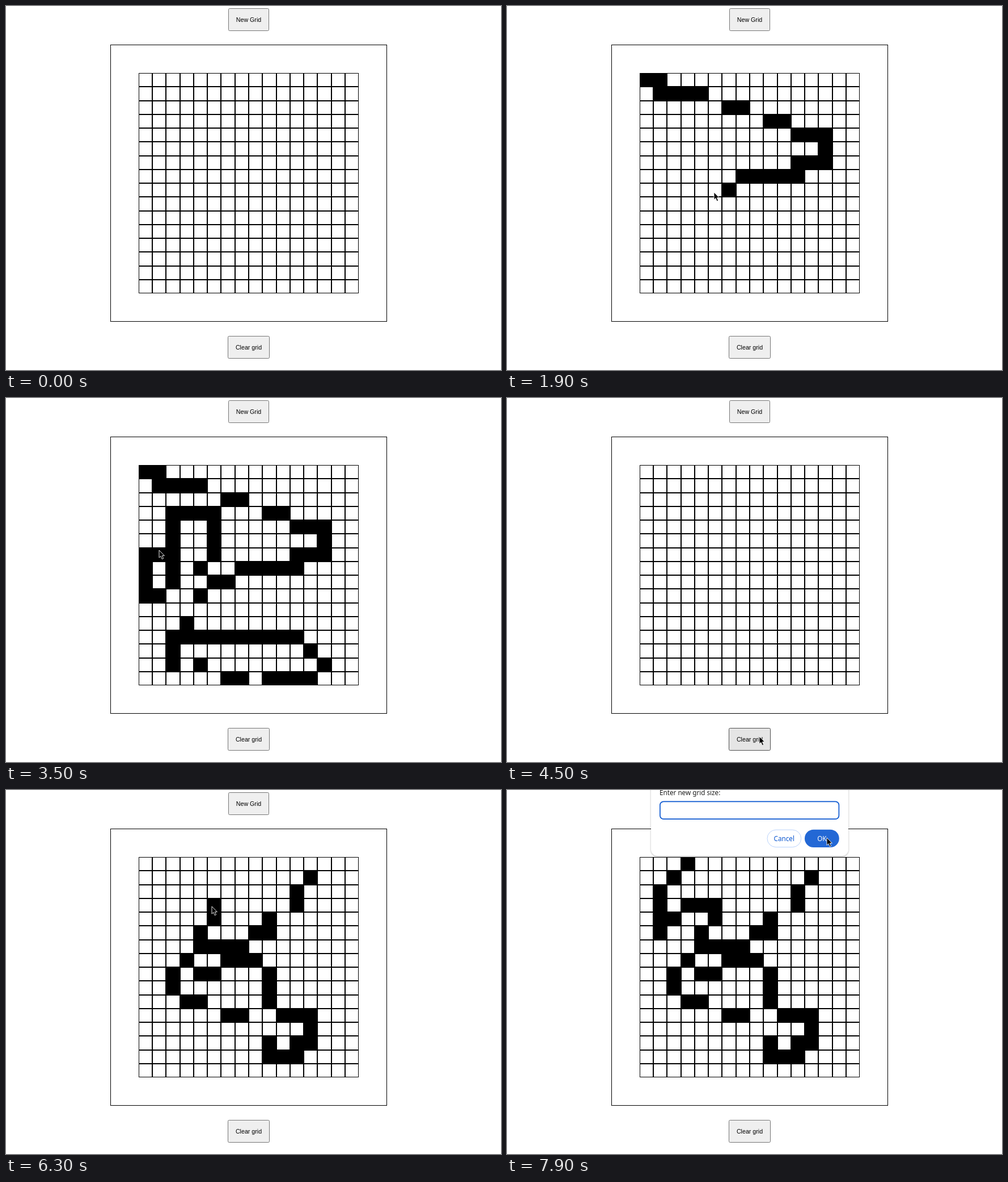
An HTML page for the animation above (8000 ms loop, 873 by 641 pixels).

```html
<!DOCTYPE html>
<html lang="en">
<head>
<meta charset="utf-8">
<title>Grid sketch</title>
<style>
  html, body { margin: 0; width: 100%; height: 100%; overflow: hidden; background: #fff; }
  svg { display: block; width: 100vw; height: 100vh; }
  .line { fill: none; stroke: #000; shape-rendering: crispEdges; }
  .btn rect { fill: #efefef; stroke: #767676; }
  .btn.hover rect { fill: #e5e5e5; stroke: #4f4f4f; }
  .btn text { font: 10.667px "Liberation Sans", Arial, sans-serif; text-anchor: middle; }
  #dialog text { font: 11.7px "Noto Sans", sans-serif; fill: #1f1f1f; }
  #dialog .mid { text-anchor: middle; }
  #panel { filter: drop-shadow(0 1px 1.5px rgba(0, 0, 0, .3)); }
  #ok rect { fill: #0b57d0; }
  #ok.hover rect { fill: #2368d5; }
</style>
</head>
<body>
<svg viewBox="0 0 873 641">
  <rect width="873" height="641" fill="#fff"/>
  <g id="new" class="btn">
    <rect x="392.5" y="4.5" width="71" height="39" rx="2"/>
    <text x="428" y="28">New Grid</text>
  </g>
  <rect class="line" x="184.5" y="68.5" width="487" height="487"/>
  <path id="fill"/>
  <path id="lines" class="line"/>
  <g id="clear" class="btn">
    <rect x="391.5" y="581.5" width="73" height="39" rx="2"/>
    <text x="428" y="605">Clear grid</text>
  </g>
  <g id="dialog">
    <rect id="panel" x="254" y="-46" width="348" height="162" rx="11" fill="#fff"/>
    <text x="269" y="9.4">Enter new grid size:</text>
    <rect x="269.9" y="20.3" width="315.5" height="30.8" rx="6.2" fill="#fff" stroke="#0b57d0" stroke-width="1.7"/>
    <rect id="caret" x="277" y="28" width="1" height="16" fill="#1f1f1f"/>
    <rect x="459" y="70.2" width="59.7" height="30.4" rx="15.2" fill="#fff" stroke="#a8c7fa" stroke-width=".8"/>
    <text class="mid" x="488.8" y="89.7" style="fill:#0b57d0">Cancel</text>
    <g id="ok">
      <rect x="525" y="69.8" width="60.8" height="31.2" rx="15.6"/>
      <text class="mid" x="555.4" y="89.7" style="fill:#fff">OK</text>
    </g>
  </g>
  <path id="cursor" d="M0 0V13.2L3 10.5L5.2 15.7L7.6 14.6L5.4 9.7H9.4Z" stroke="#fff" stroke-width=".9"/>
</svg>
<script>
const $ = id => document.getElementById(id);
const LEFT = 233.97, TOP = 118, CELL = 24.254, COUNT = 16;
const LOOP = 8000, TICK = 100;
const START = 5, CLEAR = 44, DIALOG = 72, CARET_OFF = 77;

// Pointer gestures in cell units, each with the tick at which it ends.
// H and V drag through every cell; L is a quick leap that marks only its end.
const gestures = [
  [13, 'L0,0 H1 V1 H2'],
  [19, 'H4 L6,2 H7 L9,3 H10 L11,4 H13 V6 H11 V7 H7 L6,8 L4.9,8.15'],
  [22, 'L4,9 L3,11 L2,12 V13'],
  [31, 'V14 L4,14.1 L6,15 H7 L9,15.2 H12 L13,14 L12,13 L11,12 H2 L4,7 L5,6 V3 H2 V4.6'],
  [35, 'V8 L1,9 H0 V6 H1 V5.7'],
  [40, 'L8.9,15.6'],
  [45, 'L8.2,19.2'],
  [49, 'L9.2,19.7 L20.9,12.5'],
  [54, 'L19.5,0 L16.2,-3.7 L12,1 L11,2 V3 L9,4 V5 H8 L7.3,5.5'],
  [58, 'L6,7 L5,8 H4 L3,7 L2,8 V9 L3,10 H4 L6,11 H7 L9,12.5'],
  [63, 'V14 H11 V13 H12 V11 H10 L9,10 V8 L8,7 H6 V6 H4 V5 L5,4 V3 L4.8,3.1'],
  [67, 'H3 L2,4 H1 V5 V2 L2,1 L3,0 L3.4,-1.7'],
  [70, 'L7.3,-4.3'],
  [72, 'L7.3,-4.3'],
  [75, 'L12.3,.2'],
  [76, 'L13.1,-1.9']
];

const moves = [], marks = [];

function addGesture(start, end, from, path) {
  let p = from, total = 0;
  const steps = path.split(' ').map(cmd => {
    const [a, b] = cmd.slice(1).split(',').map(Number);
    const q = { H: [a, p[1]], V: [p[0], a], L: [a, b] }[cmd[0]];
    const step = { p, q, drag: cmd[0] !== 'L', len: Math.hypot(q[0] - p[0], q[1] - p[1]) };
    total += step.len;
    p = q;
    return step;
  });
  let t = start;
  for (const { p, q, drag, len } of steps) {
    const span = total ? (end - start) * len / total : end - start;
    const move = { p, q, t, span };
    moves.push(move);
    const n = drag ? Math.ceil(len) : 1;
    for (let k = 1; k <= n; k++) addMark(move, k / n);
    t += span;
  }
  return p;
}

const along = ({ p, q }, k) => p.map((v, i) => v + (q[i] - v) * k);

function addMark(move, k) {
  const [c, r] = along(move, k).map(Math.round);
  const t = move.t + move.span * k;
  if (t < DIALOG && Math.min(c, r) >= 0 && Math.max(c, r) < COUNT) marks.push({ c, r, t });
}

let pos = [-3.6, -4.1], time = START;
for (const [end, path] of gestures) {
  pos = addGesture(time, end, pos, path);
  time = end;
}

const edge = (origin, i) => Math.round(origin + i * CELL);

function cellPath(c, r, inset) {
  const x = edge(LEFT, c) + inset, y = edge(TOP, r) + inset;
  const right = edge(LEFT, c + 1) - inset, bottom = edge(TOP, r + 1) - inset;
  return `M${x} ${y}H${right}V${bottom}H${x}z`;
}

let grid = '';
for (let r = 0; r < COUNT; r++)
  for (let c = 0; c < COUNT; c++) grid += cellPath(c, r, .5);
$('lines').setAttribute('d', grid);

function pointerAt(tick) {
  const move = moves.filter(m => m.t <= tick).pop();
  const [c, r] = along(move, Math.min(1, (tick - move.t) / move.span));
  return [Math.round(LEFT + (c + .5) * CELL), Math.round(TOP + (r + .5) * CELL)];
}

function hover(id, x, y) {
  const b = $(id).querySelector('rect').getBBox();
  const inside = x >= b.x && y >= b.y && x <= b.x + b.width && y <= b.y + b.height;
  $(id).classList.toggle('hover', inside);
}

function show(id, on) {
  $(id).style.visibility = on ? 'visible' : 'hidden';
}

function draw(tick) {
  const painted = marks.filter(m => m.t < tick - .01 && (tick < CLEAR || m.t > CLEAR));
  $('fill').setAttribute('d', painted.map(m => cellPath(m.c, m.r, 0)).join(''));
  const [x, y] = tick < START ? [-50, -50] : pointerAt(tick);
  $('cursor').setAttribute('transform', `translate(${x} ${y})`);
  show('dialog', tick >= DIALOG);
  show('caret', tick >= DIALOG && tick < CARET_OFF);
  ['new', 'clear', 'ok'].forEach(id => hover(id, x, y));
}

let last = -1;
function frame() {
  const tick = Math.floor(performance.now() % LOOP / TICK);
  if (tick !== last) draw(last = tick);
  requestAnimationFrame(frame);
}
frame();
</script>
</body>
</html>
```
